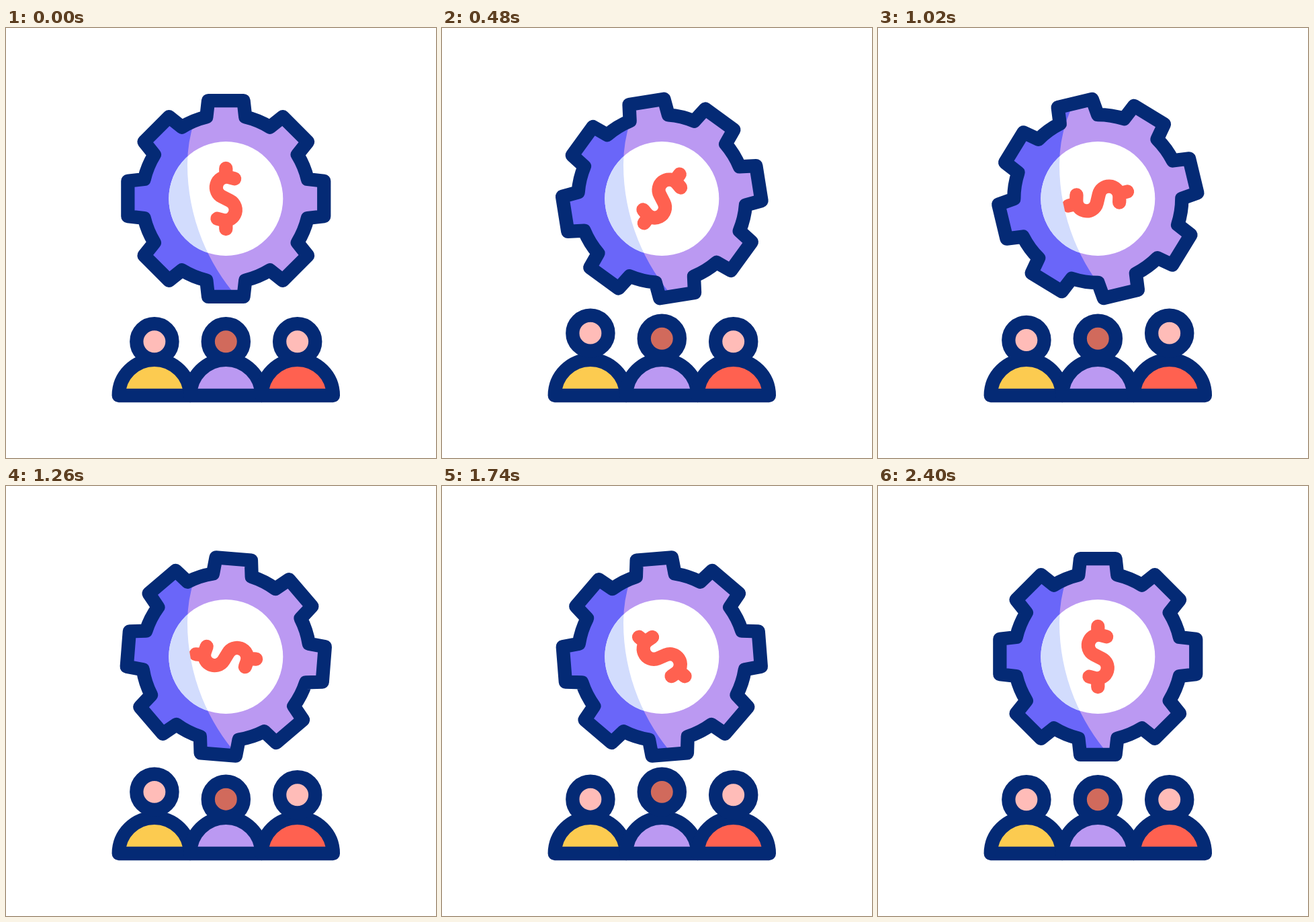
Write an HTML page with a canvas that moves like this. It is 640 px wide and 640 px high and loops after 2.42 s.

```html
<!DOCTYPE html>
<html lang="en">
<head>
<meta charset="utf-8">
<title>Team and gear</title>
<style>
  html, body { margin: 0; width: 100%; height: 100%; overflow: hidden; background: #fff; }
  canvas { display: block; }
</style>
</head>
<body>
<canvas id="stage" width="640" height="640"></canvas>
<script>
const ctx = document.getElementById('stage').getContext('2d');

const LOOP = 2420, STEP = 20, TURN = 2400;
const LINE = 20.3;
const CX = 327.3, CY = 254;
const NAVY = '#042a75', PURPLE = '#bb99f2', BLUE = '#6a66f9', PALE = '#d2dcfd',
      RED = '#ff6150', PINK = '#ffbcb8', BROWN = '#d16a5c', YELLOW = '#fccb50';

const people = [
  { x: 220.9, skin: PINK, shirt: YELLOW, delay: 0 },
  { x: 327.3, skin: BROWN, shirt: PURPLE, delay: 300 },
  { x: 433.7, skin: PINK, shirt: RED, delay: 600 }
];
const HOP = 900, HOP_HEIGHT = 12.8;

const rad = deg => deg * Math.PI / 180;

function circle(x, y, r) {
  const p = new Path2D();
  p.arc(x, y, r, 0, 2 * Math.PI);
  return p;
}

function makeGear() {
  const p = new Path2D();
  const ring = 125, tip = 148.3, tipHalf = 10.2, rootHalf = 13.4;
  for (let a = -90; a < 270; a += 45) {
    for (const side of [-1, 1]) {
      const t = rad(a + side * tipHalf);
      p.lineTo(tip * Math.cos(t), tip * Math.sin(t));
    }
    p.arc(0, 0, ring, rad(a + rootHalf), rad(a + 45 - rootHalf));
  }
  p.closePath();
  return p;
}

function makeDollar() {
  const p = new Path2D();
  p.moveTo(12.8, -29.7);
  p.arc(1.1, -16.8, 15.5, rad(-74.8), rad(116.7), true);
  p.arc(-1.1, 16.8, 15.5, rad(-63.3), rad(105.2));
  p.lineTo(-12.8, 29.7);
  for (const s of [-1, 1]) {
    p.moveTo(0, 45 * s);
    p.lineTo(0, 33 * s);
  }
  return p;
}

// Everything left of a curve that bends more tightly above y = 203.
function makeShade() {
  const p = new Path2D();
  p.moveTo(140, 80);
  p.arc(475, 203, 205, rad(217), rad(180), true);
  p.arc(570, 203, 300, rad(180), rad(136), true);
  p.lineTo(140, 420);
  p.closePath();
  return p;
}

const gear = makeGear(), dollar = makeDollar(), shade = makeShade();
const disc = circle(CX, CY, 85);

function fill(path, color) {
  ctx.fillStyle = color;
  ctx.fill(path);
}

function stroke(path, color) {
  ctx.strokeStyle = color;
  ctx.stroke(path);
}

function spun(angle, draw) {
  ctx.save();
  ctx.translate(CX, CY);
  ctx.rotate(angle);
  draw();
  ctx.restore();
}

function drawGear(angle) {
  spun(angle, () => fill(gear, PURPLE));

  const rotated = new Path2D();
  const turn = new DOMMatrix().translate(CX, CY).rotate(angle * 180 / Math.PI);
  rotated.addPath(gear, turn);
  ctx.save();
  ctx.clip(rotated);
  fill(shade, BLUE);
  ctx.restore();

  fill(disc, '#fff');
  spun(angle, () => stroke(dollar, RED));
  ctx.save();
  ctx.clip(disc);
  fill(shade, PALE);
  ctx.restore();

  spun(angle, () => stroke(gear, NAVY));
}

function hop(t) {
  if (t < 0 || t >= 2 * HOP) return 0;
  const u = 1 - Math.abs((t % HOP) / (HOP / 2) - 1);
  return HOP_HEIGHT * u * u * (3 - 2 * u);
}

function drawPerson({ x, skin, shirt, delay }, t) {
  const body = new Path2D();
  body.arc(x, 547, 53.2, Math.PI, 2 * Math.PI);
  body.closePath();
  fill(body, shirt);
  stroke(body, NAVY);

  const head = circle(x, 466.8 - hop(t - delay), 26.6);
  fill(head, skin);
  stroke(head, NAVY);
}

function render(t) {
  ctx.fillStyle = '#fff';
  ctx.fillRect(0, 0, 640, 640);
  ctx.lineWidth = LINE;
  ctx.lineCap = ctx.lineJoin = 'round';
  drawGear(Math.PI * t / TURN);
  people.forEach(person => drawPerson(person, t));
}

let start = null;
function tick(now) {
  if (start === null) start = now;
  const t = (now - start) % LOOP;
  render(Math.floor(t / STEP + 1e-6) * STEP);
  requestAnimationFrame(tick);
}
render(0);
requestAnimationFrame(tick);
</script>
</body>
</html>
```
